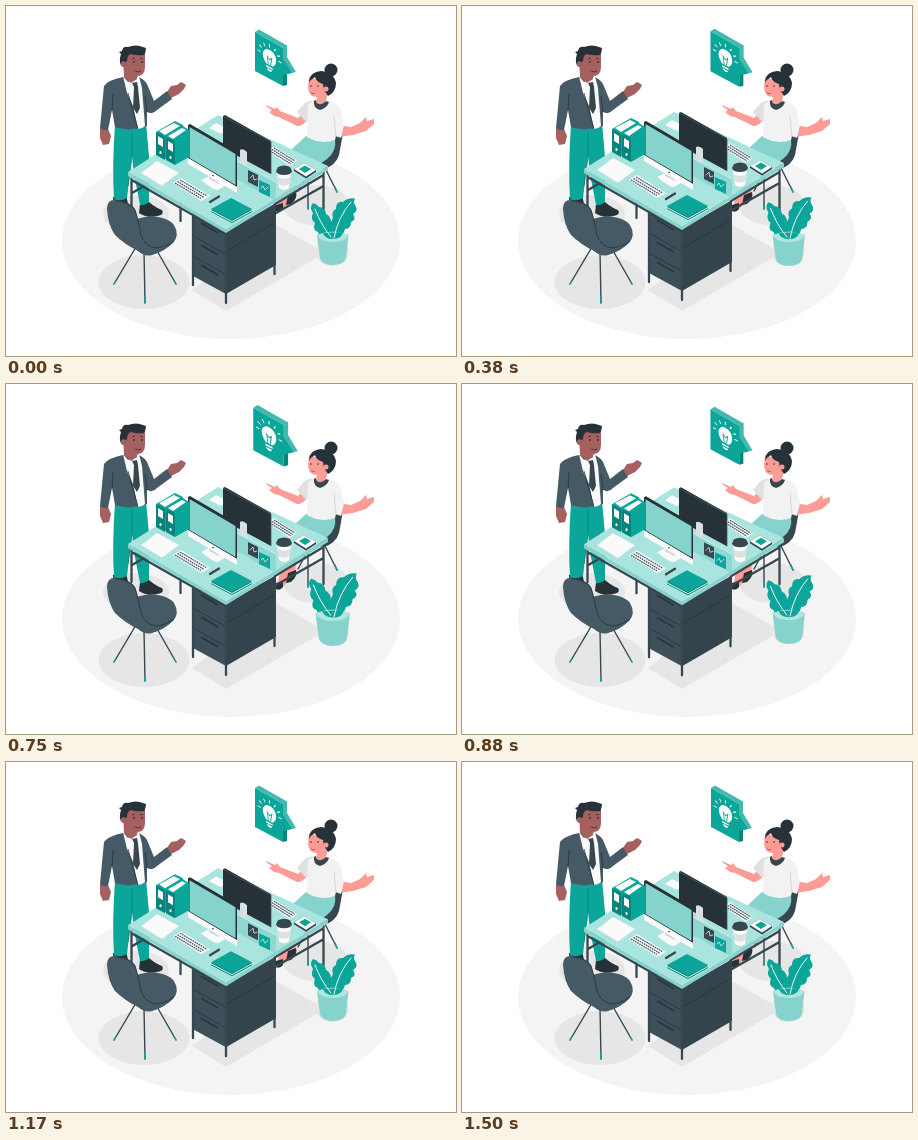
These frames come from a looping animation (450x350 px, 1540 ms). An HTML page:

```html
<!DOCTYPE html>
<html lang="en">
<head>
<meta charset="utf-8">
<title>Office talk</title>
<style>
  html, body { margin: 0; width: 100%; height: 100%; overflow: hidden; background: #fff; }
  svg { display: block; width: 100%; height: 100%; }
  .slate { fill: #455a64; } .dark { fill: #37474f; } .ink { fill: #263238; }
  .teal { fill: #0ba59a; } .deep { fill: #07847b; }
  .mint { fill: #a9e4de; } .aqua { fill: #86d2cc; }
  .white { fill: #fafafa; } .grey { fill: #e0e0e0; } .shade { fill: #e6e6e6; }
  .brown { fill: #a5605f; } .skin { fill: #fc9c96; }
  .line { fill: none; stroke: #37474f; stroke-width: 1.4; stroke-linecap: round; stroke-linejoin: round; }
  .thick { stroke-width: 2.3; }
  .hair { fill: none; stroke: #263238; stroke-width: .8; }
  .thin { fill: none; stroke: #fff; stroke-width: .9; stroke-linecap: round; stroke-linejoin: round; }
  .keys { fill: none; stroke: #455a64; stroke-width: 1.3; stroke-dasharray: 1.7 .7; }
  .tip { stroke: #0ba59a; }
</style>
</head>
<body>
<svg viewBox="0 0 450 350">
  <!-- floor and shadows -->
  <ellipse cx="225" cy="235" rx="169" ry="98" fill="#f4f4f4"/>
  <g class="shade">
    <ellipse cx="138" cy="276" rx="45.500" ry="27"/>
    <ellipse cx="130" cy="208" rx="33" ry="19"/>
    <ellipse cx="310" cy="199" rx="33" ry="20"/>
    <ellipse cx="326" cy="246" rx="16.500" ry="14"/>
    <path d="M186 284L220 305L319 247L270 219Z"/>
  </g>

  <!-- standing man -->
  <g>
    <path class="ink" d="M107 191L120 189L123 202L108 202ZM134 198L143 196Q150 202 156 204Q159 209 151 210Q140 212 133 207Z"/>
    <path class="teal" d="M109 119L140 117L143 150L143 196Q139 200 134 199L128 168L126 150L121 192Q114 196 108 193Q106 160 109 119Z"/>
    <path class="hair" style="stroke:#07847b" d="M126 126L126 150L122 180"/>
    <path class="brown" d="M94 121L102 123L105 130L103 138L97 139L94 132ZM161 86L165 80L171 79L175 76L177 77L180 79L178 83L173 88L165 92Z"/>
    <path class="slate" d="M117 71Q102 74 98 80L94 122Q98 125 102 124L106 104L109 121Q125 126 141 120L141 106Q147 109 151 104L166 93L161 85L148 95L141 78Q139 74 131 70Z"/>
    <path class="white" d="M117 70L122 76L133 70L136 82L139 120Q136 123 132 123L127 100L121 87Z"/>
    <path class="hair" d="M106 104L107 88M141 106L139 90M122 87L132 123"/>
    <path class="dark" d="M126 77L131 76L132 81L134 102L131 108L127 102L128 81Z"/>
    <path class="brown" d="M117 50L118 71L125 77L131 73L131 70Q139 70 139 61L139 47L118 46Z"/>
    <path class="ink" d="M118 61Q113 60 114 52L115 48L113 46L116 45Q117 40 122 41Q130 38 137 41L140 42Q140 46 138 49Q131 50 125 48Q121 49 121 55L119 57Z"/>
    <circle class="brown" cx="117.500" cy="58" r="2.800"/>
    <g class="ink"><circle cx="128" cy="56" r=".9"/><circle cx="136" cy="56" r=".9"/></g>
    <path class="hair" d="M126 53L129 52M134 52L137 53M129 65Q132 67 135 65"/>
  </g>

  <!-- seated woman -->
  <g>
    <path class="line" d="M302 160V203M318 160L331 186M308 155L292 185"/>
    <path class="line tip" d="M302 199V203M329 181L331 186"/>
    <path class="dark" d="M327 120Q336 119 337 127L333 149Q330 159 318 163L286 157L300 144L325 138Z"/>
    <path class="skin" d="M277 172L291 172L289 189L278 202L271 203Z"/>
    <path class="ink" d="M282 189L290 186Q292 192 285 198L280 199ZM270 199L277 197L277 203Q274 207 270 205Z"/>
    <path class="aqua" d="M300 130L329 133Q331 145 321 153L293 173L273 173Q277 151 288 141Z"/>
    <path class="skin" d="M301 103L292 112L274 105L271 101L269 103L260 99L261 101L266 104L263 106L268 110L273 111L291 120Q295 121 303 113ZM331 119L345 121L354 117L360 111L361 115L368 113L368 118L360 125L347 129L331 131Z"/>
    <path class="grey" d="M309 94Q299 95 297 99L291 106L300 116L304 111Z"/>
    <path d="M309 94L302 98L301 131Q314 139 329 134L330 130L335 132L338 119L334 103Q332 97 321 95Z" fill="#f2f2f2"/>
    <path class="hair" style="stroke:#d0d0d0" d="M330 131L328 109"/>
    <path class="dark" d="M308 95Q307 102 314 104Q321 102 323 96L320 95Q313 101 310 94Z"/>
    <path class="skin" d="M303 71L302 82Q303 91 311 91L310 96Q314 101 320 95L324 78Z"/>
    <path class="ink" d="M303 77Q303 66 315 65Q328 66 330 77Q330 86 322 90L318 84L317 78Q310 76 309 71Q305 73 303 77Z"/>
    <circle class="ink" cx="325" cy="64" r="6.500"/>
    <circle class="skin" cx="320" cy="83" r="2.500"/>
    <g class="ink"><circle cx="305" cy="80" r=".8"/><circle cx="312" cy="80" r=".8"/></g>
    <path class="hair" style="stroke:#b9473c" d="M305 87Q307 88.500 309 87"/>
  </g>

  <g id="desk">
    <!-- frame, drawers, top -->
    <path class="line thick" d="M125.500 172V204M174.500 198V215M317.500 165V206M125.500 174L187 209M269 198L317.500 169M126 187L150 173M270 207L317.500 180"/>
    <path d="M187 207L220 226V288L187 270Z" fill="#3d5059"/>
    <path d="M220 226L270 197V259L220 288Z" fill="#34444c"/>
    <path class="line thick" d="M187 208V279M220 226V297M268.500 199V268"/>
    <path class="hair" d="M189 231L219 248M189 251L219 268M189 211L219 228M221 245L268 217"/>
    <path class="hair" style="stroke-width:1.5" d="M195 217L212 227M195 239L212 249M195 259L212 269"/>
    <path class="aqua" d="M122 166L220 223L322 160V164L220 227L122 170Z"/>
    <path class="mint" d="M122 166L212 109L322 160L220 223Z"/>

    <!-- far side -->
    <path class="white" d="M203 122L210 117L222 123L215 128ZM262 145L268 140L291 155L284 160Z"/>
    <path class="keys" d="M264 145L285 158M266 143.500L287 156.500M268 142L289 155"/>
    <path class="dark" d="M288 163L298 157L310 164L310 166L300 172.500L288 165Z"/>
    <path class="white" d="M288 163L298 157L310 164L300 170.500Z"/>
    <path class="teal" d="M293 163L299 159.500L305 163L299 167Z"/>

    <!-- divider -->
    <path d="M184 130L270 176V195L184 147Z" fill="#8fd8d1"/>
    <path class="thin" style="stroke:#d2f2ee" d="M231 155L270 176"/>
    <path class="dark" d="M242 164L252 169V181L242 176Z"/>
    <path class="teal" d="M253 174L264 179V191L253 186Z"/>
    <path class="thin" style="stroke-width:.7" d="M244 172L247 169L248 174L251 173M255 182L257 180L259 184L262 181"/>

    <!-- cup -->
    <path class="white" d="M271 167L273 182Q278 186 283 182L285 167Z"/>
    <path class="grey" d="M271.500 171L272.500 178Q278 181 283.500 178L284.500 171Q278 175 271.500 171Z"/>
    <path class="dark" d="M270 165L272 161Q278 158 284 161L286 165Q285 169 278 169Q271 169 270 165Z"/>

    <!-- monitors -->
    <path class="ink" d="M217 110L219 109L265 135V168L217 142Z"/>
    <path class="hair" style="stroke:#455a64" d="M217 110L265 136V168"/>
    <path d="M234 144Q237 142 241 146V161L234 157Z" fill="#d9e0e2"/>
    <path class="white" d="M195 174L207 168L222 178L212 184Q207 184 195 174Z"/>
    <path d="M203 162L213 167V178L203 173Z" fill="#cfd8dc"/>
    <path class="ink" d="M182 119L184 118L231 145.500V181L182 152Z"/>
    <path class="aqua" d="M183.500 121L229.500 148V179L183.500 152Z"/>
    <path class="white" d="M182 152L231 181V187L182 158Z"/>
    <circle class="ink" cx="207" cy="169.500" r=".8"/>

    <!-- folders -->
    <path class="teal" d="M150 126L169 115L177 119V148L162 154L150 148Z"/>
    <path class="white" d="M153 125L168 117L174 120L159 129Z"/>
    <path class="deep" d="M150 126L159 131V154L150 149Z"/>
    <path class="teal" d="M160 131L177 120L183 124V151L169 159Z"/>
    <path class="white" d="M162 130L176 122L180 124L167 133Z"/>
    <path class="deep" d="M160 131L169 135V159L160 154Z"/>
    <path class="white" d="M152 130L157 133V141L152 138ZM162 135L167 138V146L162 143Z"/>
    <path class="thin" style="stroke-width:2" d="M154.500 146V147M164.500 151V152"/>

    <!-- near side -->
    <path class="white" d="M135 167L151 155L173 167L156 180Z"/>
    <path class="hair" style="stroke:#d0e2e0" d="M135 167L156 180L173 167"/>
    <path class="white" d="M167 177L175 172L204 190L195 195Z"/>
    <path class="keys" d="M169 177L195 192.500M171.500 175.500L198 191.500M174 174L201 190"/>
    <path class="line thick" d="M204 196L213 190.500"/>
    <path class="deep" d="M205 204L225 193L246 204V206L226 217L205 206Z"/>
    <path class="teal" d="M205 203L225 192L246 203L226 214Z"/>
    <path class="thin" d="M205 204.500L226 215.500L246 204.500"/>
  </g>

  <!-- near chair -->
  <g>
    <path class="line" d="M130 241L108 278M138 245L139 297M150 243L170 278"/>
    <path class="line tip" d="M109.500 275L108 278M138.900 291L139 297M168.300 275L170 278"/>
    <path class="slate" d="M126 214L143 210Q162 211 168 219Q174 229 167 237Q157 246 144 249Q136 249 132 242Z"/>
    <path class="slate" d="M101 203Q101 193 110 194Q125 196 129 203Q132 212 135 229Q138 239 149 242Q158 242 168 235Q160 245 146 249Q139 251 132 245Q118 238 109 229Q102 219 101 203Z"/>
    <path class="hair" d="M110 194.500Q125 197 129 204Q132 213 135 229Q138 239 149 242Q158 242 168 235"/>
  </g>

  <g id="plant">
    <path class="teal" d="M327 232Q313 233 312 226Q306 224 309 217Q304 213 307 207Q303 201 307 197Q311 198 313 201Q319 201 320 208Q326 211 325 219Q329 224 327 232Z"/>
    <path class="teal" d="M326 232Q322 219 327 212Q325 205 330 203Q330 195 337 196Q342 191 349 192.500Q347 196 349 199Q353 205 347 208Q351 213 345 216Q345 223 339 223Q337 231 329 233Z"/>
    <path class="aqua" d="M311 229Q327 222 342.500 229L340 252Q338 259 327 259Q316 259 314 252Z"/>
    <path d="M311 229Q327 223 342.500 229Q340 236 327 236Q314 236 311 229Z" fill="#b2e5de"/>
    <path class="teal" d="M317 227L337 226Q336 233 327 233Q319 233 317 227Z"/>
    <path class="thin" d="M309 203Q315 219 325 231M345 196Q332 211 328 232"/>
  </g>

  <g id="bubble">
    <path class="deep" d="M277 42L281 39V79L277 80Z"/>
    <path d="M249 26L253 23.500L281 39.500V51L290 66L281 68L277 64V42Z" fill="#43b8ae"/>
    <path class="teal" d="M249 26L277 42V53L286 67L277 69V80L249 65Z"/>
    <g transform="translate(263.500 52.500) skewY(29) scale(1.080)">
      <path class="white" d="M-3 6Q-7 2 -6 -3Q-4 -8 0 -8Q5 -8 6 -3Q7 2 3 6ZM-3 7.500H3V9H-3ZM-2.500 10H2.500Q2 12 0 12Q-2 12 -2.500 10Z"/>
      <path class="hair" style="stroke:#0ba59a" d="M-1 6L-2 -1L0 1L2 -1L1 6"/>
      <path id="rays" class="thin"/>
    </g>
  </g>
</svg>
<script>
  const LOOP = 1540;
  const byId = id => document.getElementById(id);

  byId('rays').setAttribute('d', Array.from({ length: 7 }, (_, i) => {
    const a = Math.PI * (1 + i / 6);
    const at = r => `${r * Math.cos(a)} ${r * Math.sin(a) - 2}`;
    return `M${at(8.6)}L${at(10.8)}`;
  }).join(''));

  const scaleAbout = (id, x, y, s) =>
    byId(id).setAttribute('transform', `translate(${x} ${y}) scale(${s}) translate(${-x} ${-y})`);

  // linear rise and fall between three points of the loop
  const beat = (p, from, peak, to) =>
    Math.max(0, Math.min((p - from) / (peak - from), (to - p) / (to - peak)));

  function draw(now) {
    const p = now % LOOP / LOOP;
    const lift = 3 * (1 - Math.cos(2 * Math.PI * p));
    const size = 1 + 0.1 * (beat(p, 0, 0.1, 0.3) + beat(p, 0.4, 0.5, 0.6));
    byId('desk').setAttribute('transform', `translate(0 ${-lift})`);
    scaleAbout('bubble', 269, 52, size);
    scaleAbout('plant', 327, 226, size);
  }

  const start = performance.now();
  (function tick() {
    draw(performance.now() - start);
    requestAnimationFrame(tick);
  })();
</script>
</body>
</html>
```
